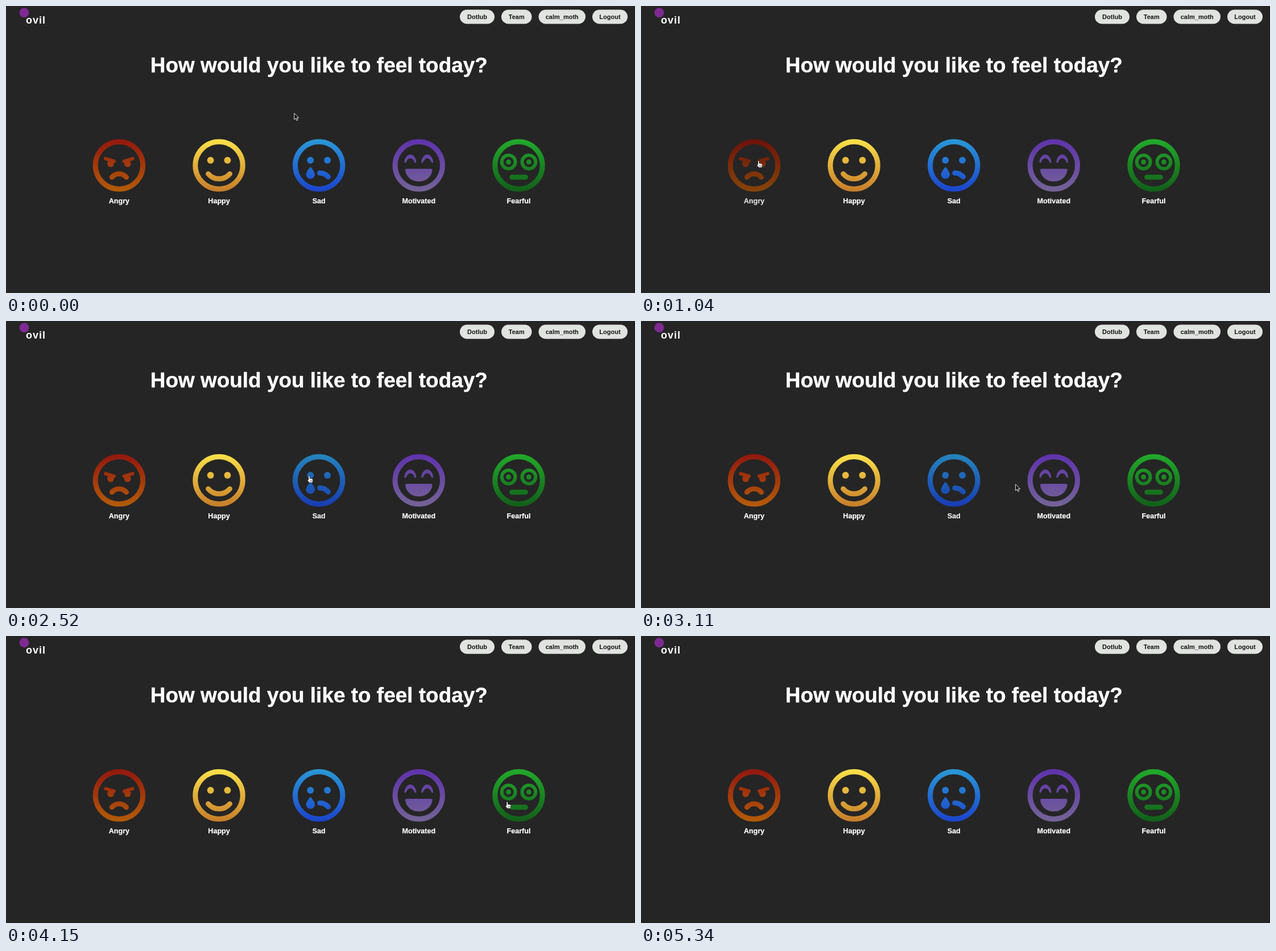
Animation of 1106x506 px, one loop 5.78 s. Source, as an HTML page:

```html
<!DOCTYPE html>
<html lang="en">
<head>
<meta charset="utf-8">
<title>Mood picker</title>
<style>
  html, body { margin: 0; width: 100%; height: 100%; overflow: hidden; background: #252525; }
  svg { display: block; }
  text { font-family: "Liberation Sans", Arial, sans-serif; font-weight: bold; fill: #fff; }
  .mid { text-anchor: middle; }
  .title { font-size: 36.95px; stroke: #fff; stroke-width: .4; }
  .label { font-size: 12.6px; stroke: #fff; stroke-width: .2; }
  .nav { font-size: 11px; fill: #111; }
  .brand { font-size: 18px; letter-spacing: 1px; }
  .line { fill: none; stroke-linecap: round; }
</style>
</head>
<body>
<svg width="1106" height="506" viewBox="0 0 1106 506">
  <defs id="defs"></defs>
  <rect width="1106" height="506" fill="#252525"/>
  <rect x="1105" width="1" height="506" fill="#141414"/>
  <circle cx="32" cy="11.7" r="8.5" fill="#7e2a92"/>
  <text class="brand" x="35" y="30.5">ovil</text>
  <g id="nav"></g>
  <text class="title mid" x="550.3" y="117">How would you like to feel today?</text>
  <g id="moods"></g>
  <path id="arrow" d="M0 0V11.2L2.6 8.9L4.3 12.9L6.2 12.1L4.5 8.2H8Z"
        fill="#111" stroke="#fff" stroke-width=".9" stroke-linejoin="round"/>
  <g id="hand" stroke="#111" stroke-width=".6" stroke-linejoin="round">
    <path fill="#fff" d="M-3.2-5a1.1 1.1 0 0 1 2.2 0V-1.6L3-1Q4.8-.5 4.7 1.1L3.9 5.8H-1.8L-5 1.8Q-5.4 .2-3.2 1Z"/>
    <path fill="none" d="M-.3 1.7V4M1.3 1.7V4M2.9 1.7V4"/>
  </g>
</svg>
<script>
const LOOP = 5780;
const TICK = 148;          // the picture moves in steps of about this many ms
const SIZE = 92.4, UNITS = 496, TOP = 234.8;
const $ = id => document.getElementById(id);
const centre = i => 198.9 + 175.65 * i;

// Face parts, drawn on a 496-unit disc centred on (248, 256).
const dot = (x, y, r = 32) => `<circle cx="${x}" cy="${y}" r="${r}"  stroke="none"/>`;
const ring = (x, y, r, w) => `<circle class="line" cx="${x}" cy="${y}" r="${r}" stroke-width="${w}"/>`;
const line = (d, w = 48) => `<path class="line" d="${d}" stroke-width="${w}"/>`;
const shape = d => `<path d="${d}" stroke="none"/>`;
const pair = part => part + `<g transform="translate(496 0) scale(-1 1)">${part}</g>`;

const eyes = pair(dot(168, 208));
const scowl = pair(line("M120 192L200 216", 32) + dot(168, 240));
const stare = pair(ring(152, 224, 64, 32) + dot(152, 224, 24));
const beam = pair(shape(`M168 152C144 152 115 181 112 223C111 232 123 235 127 228L136 211
  C144 197 156 189 168 189S192 197 200 211L209 228C213 235 225 232 224 223C221 181 192 152 168 152Z`));
const tear = shape("M162 275C151 290 126 325 126 343a42 41 0 0 0 84 0C210 325 185 290 174 275Q168 270 162 275Z");
const laugh = shape("M362 288H134Q119 288 120 303C128 362 179 408 241 408H255C317 408 368 362 376 303Q377 288 362 288Z");

const moods = [
  { name: "Angry", top: "#92170e", bottom: "#b35c08",
    face: scowl + line("M180 368C197 348 222 336 248 336S299 348 316 368") },
  { name: "Happy", top: "#fbe24a", bottom: "#c67c2a",
    face: eyes + line("M146 336C171 366 208 384 248 384S325 366 350 336") },
  { name: "Sad", top: "#2a98d6", bottom: "#1b44cc",
    face: eyes + tear + line("M256 328C287 328 316 342 336 365") },
  { name: "Motivated", top: "#5f32ad", bottom: "#736496", face: beam + laugh },
  { name: "Fearful", top: "#22aa2b", bottom: "#125e19", face: stare + line("M184 368H312") }
];

moods.forEach((m, i) => {
  const scale = SIZE / UNITS;
  $("defs").innerHTML += `<linearGradient id="g${i}" gradientUnits="userSpaceOnUse" x1="0" y1="8" x2="0" y2="504">
    <stop stop-color="${m.top}"/><stop offset="1" stop-color="${m.bottom}"/></linearGradient>`;
  $("moods").innerHTML += `<g>
    <g transform="translate(${centre(i) - SIZE / 2} ${TOP - 8 * scale}) scale(${scale})" fill="url(#g${i})" stroke="url(#g${i})">
      ${ring(248, 256, 224, 48)}${m.face}</g>
    <text class="label mid" x="${centre(i)}" y="348">${m.name}</text></g>`;
});

// Buttons run leftwards from the right margin.
let right = 1093;
for (const [label, w] of [["Logout", 62], ["calm_moth", 82.5], ["Team", 53.5], ["Dotlub", 61]]) {
  $("nav").innerHTML += `<rect x="${right - w}" y="6.5" width="${w}" height="25" rx="12.5" fill="#e1e3e1"/>
    <text class="nav mid" x="${right - w / 2}" y="23">${label}</text>`;
  right -= w + 12;
}

// One pointer move per mood in order, then one off the stage.
const home = { x: 506.8, y: 189 };
const moves = [
  { from: 150, to: 1040, x: 208.8, y: 279, lift: 92 },
  { from: 1480, to: 1930, x: 375.8, y: 292.3 },
  { from: 2380, to: 2670, x: 555, y: 277.5 },
  { from: 3110, to: 3410, x: 741.5, y: 296 },
  { from: 4010, to: 4450, x: 930.5, y: 299 },
  { from: 4890, to: 5340, x: 1114, y: 514 }
];
for (const m of moves) m.count = Math.round((m.to - m.from) / TICK) + 1;

const clamp = (v, lo, hi) => Math.min(hi, Math.max(lo, v));
const easeOut = p => 1 - (1 - p) ** 2;

function stepsDone(m, t) {
  const tick = (m.to - m.from) / (m.count - 1);
  return clamp(Math.floor((t - m.from + 6) / tick) + 1, 0, m.count);
}

function pointer(t) {
  let { x, y } = home;
  for (const m of moves) {
    const e = easeOut(stepsDone(m, t) / m.count);
    x += (m.x - x) * e;
    y += (m.y - y) * e - (m.lift || 0) * Math.sin(Math.PI * e);
  }
  return { x, y };
}

// A mood fades over two steps as the pointer arrives, and back as it leaves.
function dimming(i, t) {
  const left = moves[i].count - stepsDone(moves[i], t);
  const gone = stepsDone(moves[i + 1], t);
  return clamp(1 - (left + gone) / 2, 0, 1);
}

const overMood = (x, y) => y > TOP && moods.some((m, i) => Math.abs(x - centre(i)) < SIZE / 2);

function place(el, x, y, shown) {
  el.setAttribute("transform", `translate(${x} ${y})`);
  el.style.display = shown ? "" : "none";
}

const groups = [...$("moods").children];

function draw(t) {
  const { x, y } = pointer(t);
  const hand = overMood(x, y);
  place($("hand"), x, y, hand);
  place($("arrow"), x, y, !hand);
  groups.forEach((g, i) => {
    const [face, label] = g.children;
    const dim = dimming(i, t);
    face.style.filter = dim ? `brightness(${1 - .25 * dim})` : "none";
    label.style.opacity = 1 - .15 * dim;
  });
}

const start = performance.now();
function frame() {
  draw((performance.now() - start) % LOOP);
  requestAnimationFrame(frame);
}
frame();
</script>
</body>
</html>
```
